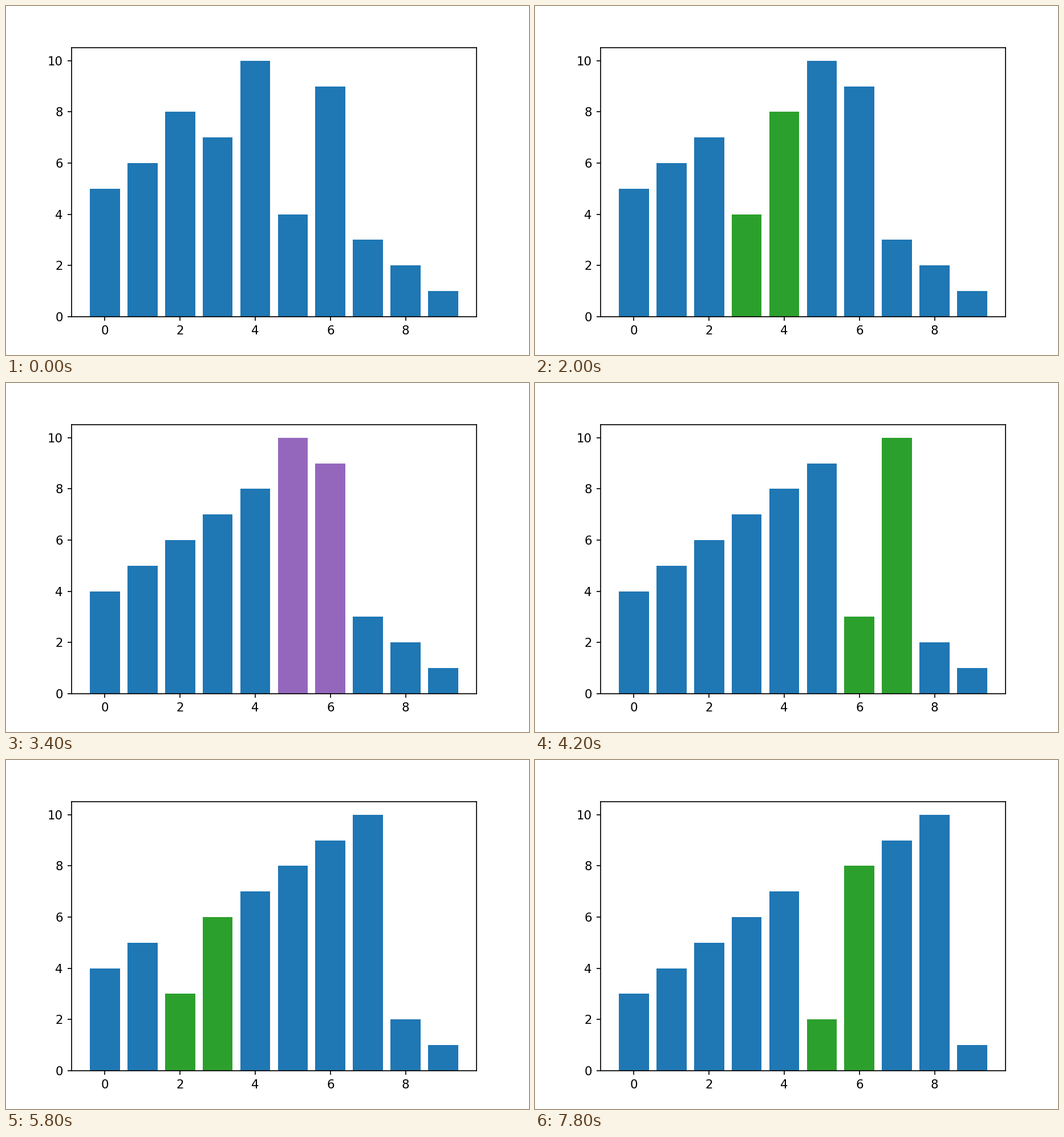
A matplotlib script for the animation above (8 s loop, 917 px wide and 611 px high).

```python
"""Insertion sort shown as a bar chart: purple compares, green swaps."""
from itertools import islice

import matplotlib.pyplot as plt
from matplotlib.animation import FuncAnimation

WIDTH, HEIGHT, DPI = 917, 611, 152.8
FRAMES, INTERVAL = 40, 200
IDLE, COMPARE, SWAP = "tab:blue", "tab:purple", "tab:green"
VALUES = [5, 6, 8, 7, 10, 4, 9, 3, 2, 1]


def insertion_sort(values):
    """Yield (heights, active pair, colour of the pair) for each step."""
    a = list(values)
    yield a[:], (), IDLE
    for i in range(1, len(a)):
        for j in range(i, 0, -1):
            pair = (j - 1, j)
            yield a[:], pair, COMPARE
            if a[j - 1] <= a[j]:
                break
            a[j - 1], a[j] = a[j], a[j - 1]
            yield a[:], pair, SWAP


steps = list(islice(insertion_sort(VALUES), FRAMES))

# The tiny margin keeps the pixel size from being rounded down.
fig, ax = plt.subplots(figsize=((WIDTH + 0.001) / DPI, (HEIGHT + 0.001) / DPI),
                       dpi=DPI)
bars = ax.bar(range(len(VALUES)), VALUES, color=IDLE)
ax.set_xticks(range(0, 10, 2))
ax.set_yticks(range(0, 11, 2))
ax.set_xlim(-0.89, 9.89)
ax.set_ylim(0, 10.5)


def update(frame):
    heights, pair, colour = steps[frame]
    for k, (bar, height) in enumerate(zip(bars, heights)):
        bar.set_height(height)
        bar.set_color(colour if k in pair else IDLE)
        bar.set_linewidth(0)
    return list(bars)


anim = FuncAnimation(fig, update, frames=FRAMES, interval=INTERVAL,
                     init_func=lambda: update(0), repeat=True, repeat_delay=0)
plt.show()
```
